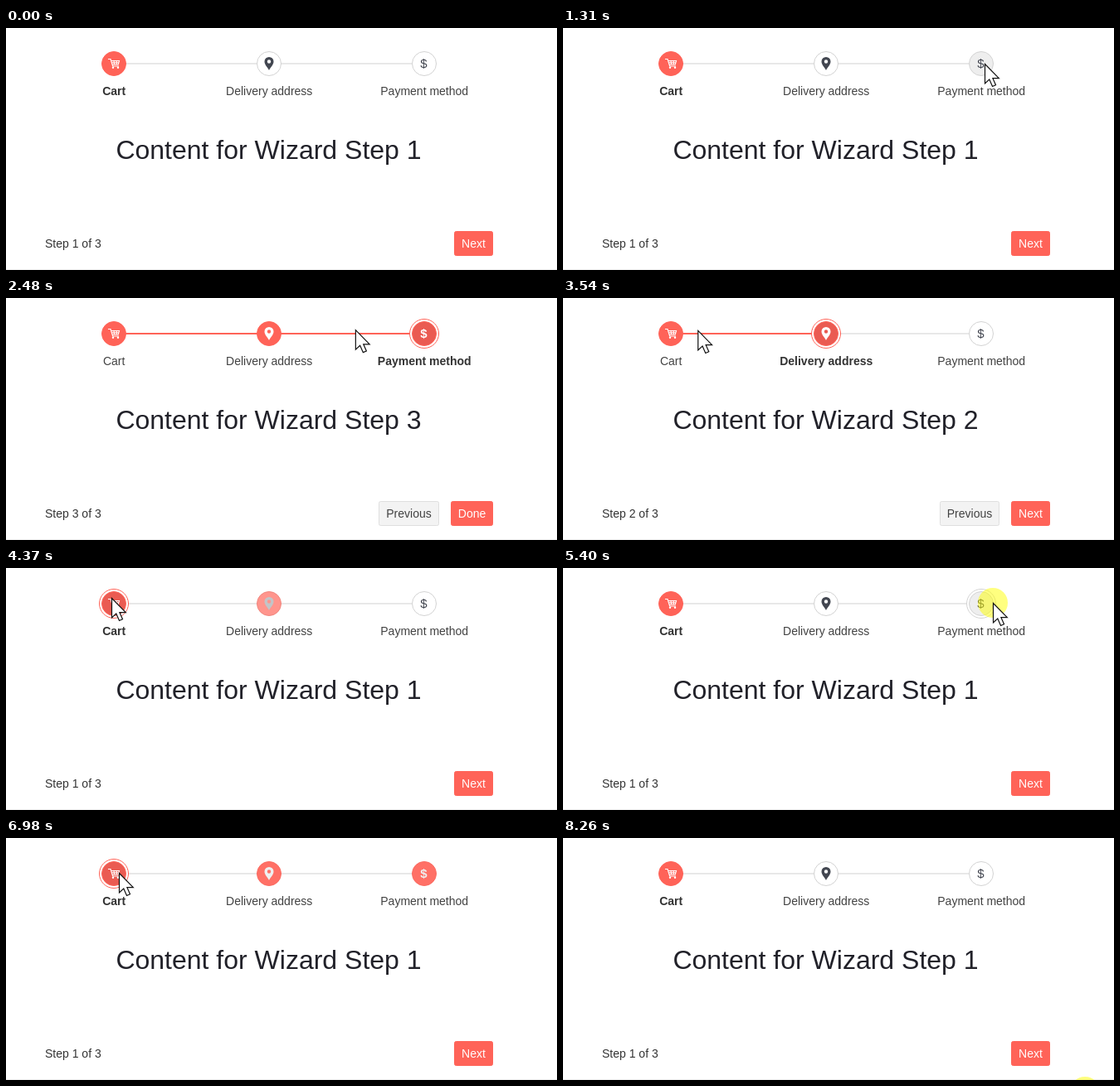
An HTML page with a canvas that plays this animation: 664x292 px, repeating every 8.33 s.

```html
<!DOCTYPE html>
<html lang="en">
<head>
<meta charset="utf-8">
<title>Wizard steps</title>
<style>
  html, body { margin: 0; width: 100%; height: 100%; overflow: hidden; background: #fff; }
  canvas { display: block; }
</style>
</head>
<body>
<canvas id="stage" width="664" height="292"></canvas>
<script>
const ctx = document.getElementById('stage').getContext('2d');
const LOOP = 8330, PRESS = 200, FADE = 400;
const FONT = '"Liberation Sans", Arial, sans-serif';
const WHITE = [255, 255, 255], RED = [255, 99, 88], DARK_RED = [234, 91, 82];
const GREY = [238, 238, 238], BORDER = [211, 211, 211], ICON = [66, 70, 80];
const Y = 43;
const steps = [
  { x: 130, label: 'Cart', icon: drawCart },
  { x: 317, label: 'Delivery address', icon: drawPin },
  { x: 504, label: 'Payment method', icon: drawDollar },
];

// Mouse presses; a press without a step only removes the focus.
const clicks = [
  { t: 1650, x: 508, y: 43, step: 2 },
  { t: 2830, x: 318, y: 52, step: 1 },
  { t: 4020, x: 127, y: 35, step: 0 },
  { t: 5400, x: 518, y: 42, step: 2 },
  { t: 6710, x: 136, y: 42, step: 0 },
  { t: 8260, x: 629, y: 306 },
];

const linear = k => k;
const easeIn = k => k * k;
const easeOut = k => 1 - (1 - k) ** 3;
const smooth = k => k * k * (3 - 2 * k);

// Pointer legs: start, end, destination, easing.
const start = [606, 294];
const legs = [
  [660, 1310, 508, 43, smooth],
  [2340, 2480, 422, 38, easeIn],
  [2480, 2750, 318, 52, easeOut],
  [3330, 3820, 127, 36, easeOut],
  [4790, 5070, 525, 46, smooth],
  [5070, 5140, 518, 42, linear],
  [6090, 6340, 236, 47, easeIn],
  [6340, 6510, 136, 42, easeOut],
  [7400, 8000, 629, 306, smooth],
];

const clamp = k => Math.max(0, Math.min(1, k));
const lerp = (a, b, k) => a + (b - a) * k;
const mix = (a, b, k) => a.map((v, i) => lerp(v, b[i], k));
const rgb = c => `rgb(${c.map(Math.round).join(',')})`;

function pointerAt(t) {
  let [x, y] = start;
  for (const [t0, t1, toX, toY, ease] of legs) {
    if (t < t0) break;
    const k = ease(clamp((t - t0) / (t1 - t0)));
    x = lerp(x, toX, k);
    y = lerp(y, toY, k);
  }
  return { x, y };
}

function stateAt(t) {
  const state = { from: 0, step: 0, fade: 1, focus: -1, press: null };
  for (const c of clicks) {
    if (t < c.t) break;
    state.focus = c.step ?? -1;
    state.press = t < c.t + PRESS ? c : null;
    if (c.step === undefined || state.press) continue;
    state.from = state.step;
    state.step = c.step;
    state.fade = smooth(clamp((t - c.t - PRESS) / FADE));
  }
  return state;
}

function text(str, x, y, { size = 14, color = '#333', align = 'left', bold = false } = {}) {
  ctx.font = `${bold ? 'bold ' : ''}${size}px ${FONT}`;
  ctx.textAlign = align;
  ctx.fillStyle = color;
  ctx.fillText(str, x, y);
}

function disc(x, y, r, fill, stroke) {
  ctx.beginPath();
  ctx.arc(x, y, r, 0, Math.PI * 2);
  if (fill) { ctx.fillStyle = fill; ctx.fill(); }
  if (stroke) { ctx.strokeStyle = stroke; ctx.lineWidth = 1; ctx.stroke(); }
}

const cartLines = new Path2D('M-7 -5.5h3l2.6 8.5h7.4M-3.6 -3.5h10.1l-1.2 4.5h-7.4M-3 -1.2h9M0 -3.5l.6 4.5M3.2 -3.5v4.5');
const pinShape = new Path2D('M0 8C-1.5 4.5 -5.5 1.5 -5.5 -2.5A5.5 5.5 0 0 1 5.5 -2.5C5.5 1.5 1.5 4.5 0 8ZM2.2 -2.5A2.2 2.2 0 1 0 -2.2 -2.5A2.2 2.2 0 1 0 2.2 -2.5Z');
const arrow = new Path2D('M0 0V23.5L5.3 18.6L9 27L13 25.3L9.4 17.2H16.8Z');

function drawCart(color) {
  ctx.strokeStyle = color;
  ctx.lineWidth = 1.1;
  ctx.stroke(cartLines);
  disc(-1, 4.8, 1.2, color);
  disc(5, 4.8, 1.2, color);
}

function drawPin(color) {
  ctx.fillStyle = color;
  ctx.fill(pinShape, 'evenodd');
}

function drawDollar(color, done) {
  text('$', -0.5, 5, { size: 15, color, align: 'center', bold: done > 0.5 });
}

function drawStep(i, state, pointer) {
  const { x, label, icon } = steps[i];
  const done = lerp(+(i <= state.from), +(i <= state.step), state.fade);
  const focused = state.focus === i;
  const active = focused || Math.hypot(pointer.x - x, pointer.y - Y) < 15;
  const fill = mix(active ? GREY : WHITE, active ? DARK_RED : RED, done);
  const edge = rgb(mix(BORDER, RED, done));

  if (focused) disc(x, Y, 17.5, '#fff', edge);
  disc(x, Y, 14.5, rgb(fill), edge);
  ctx.save();
  ctx.translate(x, Y);
  icon(rgb(mix(ICON, WHITE, done)), done);
  ctx.restore();

  const current = i === state.step;
  text(label, x + 0.2, 81, { align: 'center', bold: current, color: current ? '#333' : '#424242' });
}

function drawTrack(state) {
  const first = steps[0].x, length = steps[2].x - first;
  const grow = state.step > state.from ? state.fade : 1;
  ctx.fillStyle = '#e8e8e8';
  ctx.fillRect(first, Y - 1, length, 2);
  ctx.fillStyle = rgb(RED);
  ctx.fillRect(first, Y - 1, length * lerp(state.from, state.step, grow) / 2, 2);
}

function button(label, x, width, primary) {
  ctx.beginPath();
  ctx.roundRect(x + 0.5, 245.5, width - 1, 29, 2);
  ctx.fillStyle = primary ? rgb(RED) : '#f3f3f3';
  ctx.fill();
  ctx.strokeStyle = primary ? rgb(RED) : '#dfdfdf';
  ctx.lineWidth = 1;
  ctx.stroke();
  text(label, x + width / 2, 265, { align: 'center', color: primary ? '#fff' : '#424242' });
}

function drawContent(step) {
  text(`Content for Wizard Step ${step + 1}`, 132.4, 158, { size: 32, color: '#212129' });
  text(`Step ${step + 1} of 3`, 47, 265);
  const last = step === 2;
  if (step > 0) button('Previous', last ? 449 : 454, last ? 73 : 72, false);
  if (last) button('Done', 536, 51, true);
  else button('Next', 540, 47, true);
  ctx.fillStyle = '#ededed';
  ctx.fillRect(0, 291, 664, 1);
}

function drawPointer({ x, y }) {
  ctx.save();
  ctx.translate(x + 0.5, y + 0.5);
  ctx.fillStyle = '#fff';
  ctx.fill(arrow);
  ctx.strokeStyle = '#111';
  ctx.lineWidth = 1.2;
  ctx.stroke(arrow);
  ctx.restore();
}

function draw(now) {
  const t = now % LOOP;
  const state = stateAt(t), pointer = pointerAt(t);
  ctx.fillStyle = '#fff';
  ctx.fillRect(0, 0, 664, 292);
  drawTrack(state);
  steps.forEach((_, i) => drawStep(i, state, pointer));
  drawContent(state.step);
  if (state.press) disc(state.press.x, state.press.y, 18, 'rgba(255,255,0,.5)');
  if (t >= 680) drawPointer(pointer);
  requestAnimationFrame(() => draw(performance.now() - origin));
}

const origin = performance.now();
draw(0);
</script>
</body>
</html>
```
